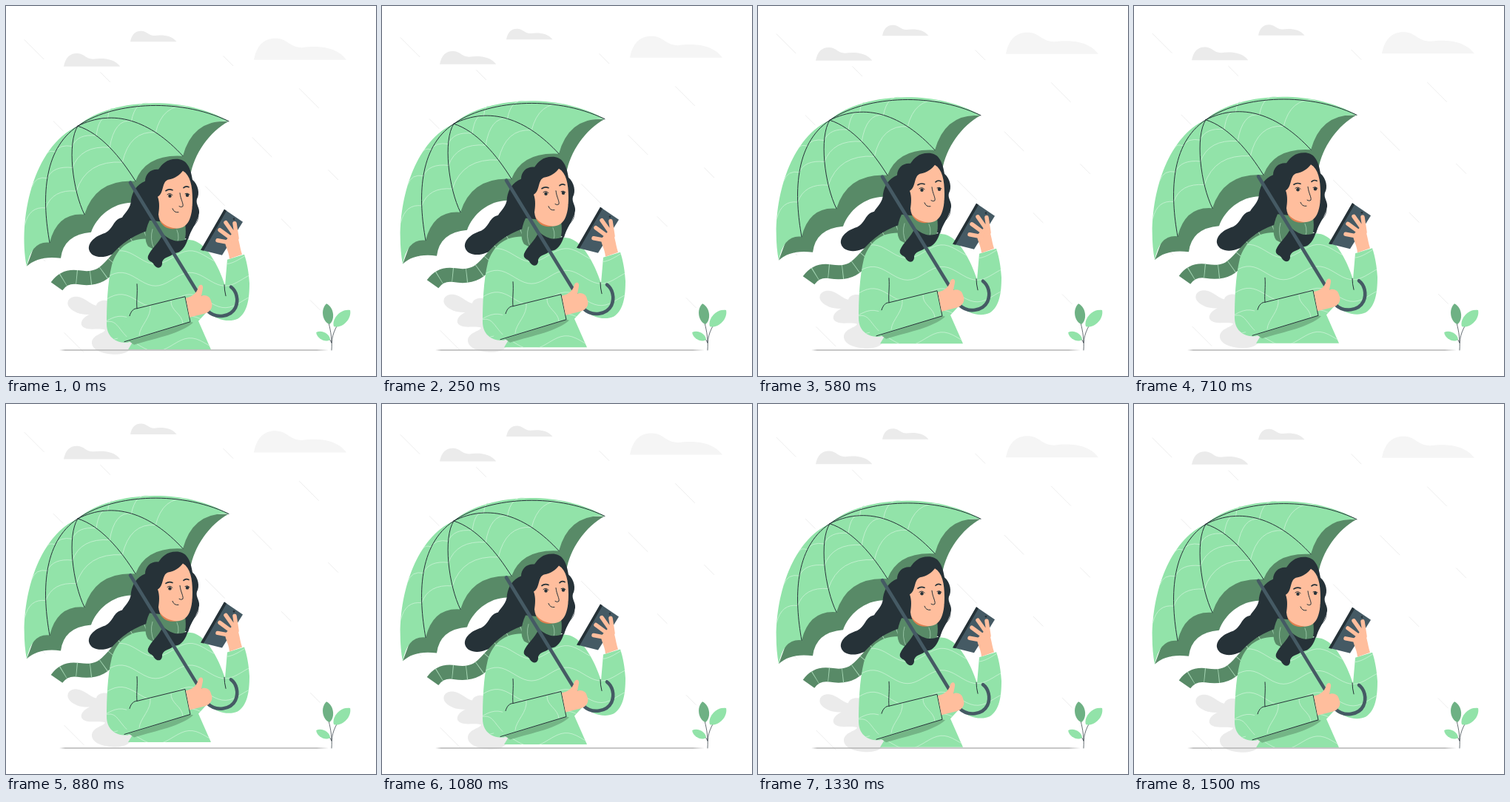
These frames come from a looping animation (500x500 px, 1.54 s). An HTML page:

```html
<!DOCTYPE html>
<html lang="en">
<head>
<meta charset="utf-8">
<style>
html, body { margin: 0; height: 100%; overflow: hidden; background: #fff; }
svg { display: block; width: 100vw; height: 100vh; }
.line { fill: none; stroke-linecap: round; stroke-linejoin: round; }
.ink { stroke: #263238; stroke-width: 1; }
.bold { stroke-width: 1.7; }
.fine { stroke-width: .7; }
.knit { stroke: #c6f1d2; stroke-width: .9; }
.rain { stroke: #ebebeb; stroke-width: .9; }
.pole { stroke: #455a64; stroke-width: 4.6; }
.scarf { fill: none; stroke: #588a67; stroke-width: 19; }
.stripes { stroke: #a5d5b3; stroke-dasharray: .9 18; stroke-dashoffset: -12; }
.finger { stroke: #ffbe9d; stroke-width: 5.5; }
.mint { fill: #92e3a9; }
.moss { fill: #588a67; }
.hair { fill: #263238; }
.skin { fill: #ffbe9d; }
.mist { fill: #ebebeb; }
</style>
</head>
<body>
<svg viewBox="0 0 500 500">
  <defs>
    <path id="cloud" d="M0 0C4-21 15-30 31-29C46-28 48-17 65-16.500C84-19 111-19 125 0Z"/>
    <path id="leaf" d="M0 0C4-8 20-9 26 0C20 9 4 8 0 0Z"/>
    <path id="sweater" d="M194 315C166 313 150 328 143 350C137 374 136 407 136 430C136 447 148 456 164 455L172 453L165 464.500H277L260 426L272 413C282 423 300 429 313 423C326 415 329 397 329 375C328 360 326 348 322 336L299 343L296 378C287 350 271 322 253 317L231 314Z"/>
    <path id="tail" d="M68.500 379Q79 364 98 367C147 375 138 332 194 313"/>
    <clipPath id="inside"><use href="#sweater"/></clipPath>
  </defs>

  <g id="scene">
    <use href="#cloud" fill="#f5f5f5" transform="translate(335 73)"/>
    <use href="#cloud" class="mist" transform="translate(78 82) scale(.61)"/>
    <use href="#cloud" class="mist" transform="translate(168 48.500) scale(.5)"/>
    <path id="rain" class="line rain"/>
    <path class="mist" d="M96 393C85 392 80 401 86 408C92 415 104 418 113 417C102 422 98 431 106 435C113 439 125 435 134 438C132 443 118 444 116 454C115 466 133 471 148 471C161 471 169 466 172 457L146 402C137 396 124 397 122 405C114 404 107 394 96 393Z"/>

    <!-- umbrella -->
    <path class="moss" d="M28 352Q44 337 74 341Q78 309 115 306C122 285 145 265 172 266L249 230C254 200 275 170 301 156L98 162Z"/>
    <path id="canopy" class="mint"/>
    <path id="weave" class="line knit"/>
    <path id="ribs" class="line ink"/>

    <!-- hair and scarf -->
    <path class="hair" d="M230 207C217 207 211 214 206 221C196 220 188 227 188 237C176 242 171 251 169 262C169 274 160 280 157 286C144 289 146 301 134 307C121 311 111 319 112 329C115 341 131 341 140 337C153 334 158 320 170 314C187 309 195 303 213 302L246 316C249 303 259 293 261 280C262 273 256 268 258 261C262 254 260 242 252 235C249 216 243 207 230 207Z"/>
    <use href="#tail" class="scarf"/>
    <use href="#tail" class="scarf stripes"/>

    <!-- sweater -->
    <use href="#sweater" class="mint"/>
    <path id="waves" class="line knit" clip-path="url(#inside)"/>
    <path class="mint" d="M150 452L167 412Q170 409 177 409L242 393L249 427L164 455Z"/>
    <path fill="#74b586" d="M166 453L249 427L253 428C236 443 206 448 173 458Z"/>
    <path class="line knit" d="M195 405C197 421 181 432 180 445M223 399C222 412 238 416 239 429M136 427C149 424 151 435 163 447"/>
    <path class="line ink" d="M177 376C178 389 176 398 177 409M167 419C169 412 173 409 177 409L242 393L249 427L160 454M295 377Q295 384 297 392"/>

    <!-- collar, lock and face -->
    <path class="moss" d="M194 290C187 305 187 318 192 325C202 332 221 334 234 330C243 322 244 307 242 295Z"/>
    <path class="line knit" stroke-opacity=".6" d="M198 302Q194 315 200 328M231 303Q236 314 229 326"/>
    <path class="hair" d="M212 308C206 322 196 328 192 338C190 346 199 345 200 350C205 357 212 354 211 346C214 338 224 340 226 334C235 336 243 326 246 314C234 321 222 318 212 308Z"/>
    <path class="skin" d="M239 223C249 229 252 243 252 262C252 287 246 301 230 301C216 301 207 295 206 282C207 275 208 266 205 258C214 253 210 238 219 235C229 233 234 229 239 223Z"/>
    <path fill="#df8050" d="M207 288C213 297 221 300 231 301C218 303 211 298 207 288Z"/>
    <path class="line ink fine" d="M252 272C263 280 262 290 252 299C247 303 246 307 247 311"/>
    <path class="line ink" d="M235 253C236 262 240 267 239 271Q237 273 234 271M218 255Q222 252 225 256M242 254Q245 252 248 255M225 274Q227 280 233 279"/>
    <path class="line ink bold" d="M216 250Q220 247 225 249M240 246Q243 243 247 245"/>
    <circle class="hair" cx="221.500" cy="257" r="2.200"/>
    <circle class="hair" cx="245" cy="256" r="2.200"/>

    <!-- handle, phone and hands -->
    <path class="line pole" stroke-linecap="butt" d="M168 239L263 394M272 412C284 424 304 420 310 408C315 397 311 385 304 380"/>
    <path class="skin" d="M243 395C252 393 258 388 260 380C262 375 267 377 266 382L264 392C270 390 276 393 277 399C281 407 276 414 268 416L248 421Z"/>
    <path fill="#455a64" d="M295 275L320 292L292 337L264 330Z"/>
    <path class="hair" d="M295 275L298 277L267 331L263 330Z"/>
    <circle class="hair" cx="308" cy="288" r="1.300"/>
    <path class="skin" d="M302 342C301 331 296 325 296 318L309 304C315 312 315 323 319 336Z"/>
    <path class="line finger" d="M309 310L297 293M304 314L289 303M302 320L286 317M312 314L309 294"/>
  </g>

  <path fill="#b4b4b4" d="M72 465L80 464.200H420L436 465L420 465.800H80Z"/>
  <path class="line ink fine" d="M440 465C441 452 439 440 436 428M440 455C441 442 447 430 457 419M440 455Q436 446 427 442"/>
  <use href="#leaf" fill="#6eb184" transform="translate(437 430) rotate(-98) scale(1.080)"/>
  <use href="#leaf" class="mint" transform="translate(443 433) rotate(-45) scale(1.200)"/>
  <use href="#leaf" class="mint" transform="translate(438 451) rotate(208) scale(.82)"/>
</svg>
<script>
const LOOP = 1540;
const scene = document.getElementById('scene');
const setPath = (id, d) => document.getElementById(id).setAttribute('d', d);
const range = n => [...Array(n).keys()];

// Ribs leave the apex as cubics: two control points and a tip, left to right.
const apex = [97, 162.5];
const ribs = [
  [[36, 190], [16, 290], [28, 352]],
  [[48, 195], [49, 265], [59, 320]],
  [[82, 185], [90, 250], [106, 282]],
  [[128, 172], [155, 205], [175, 237]],
  [[145, 138], [195, 155], [239, 203]],
  [[140, 125], [240, 120], [301, 156]]
];
const topSeam = [[140, 132], [230, 122], [301, 156]];

const pointOn = ([b, c, d], t) => [0, 1].map(k =>
  (1 - t) ** 3 * apex[k] + 3 * t * (1 - t) ** 2 * b[k] +
  3 * t * t * (1 - t) * c[k] + t ** 3 * d[k]);

// Scallop rising from the lower left point p to the upper right point q.
const scallop = (p, q) => `Q${p[0] + .22 * (q[0] - p[0])} ${q[1] - 3} ${q}`;
const ribPath = rib => `M${apex}C${rib.join(' ')}`;

const tips = ribs.map(rib => rib[2]);
const hem = tips.slice(1).map((tip, i) => scallop(tips[i], tip)).join('');
const [edge, crown] = [ribs[0], ribs[5]];
setPath('canopy', `M${tips[0]}${hem}C${crown[1]} ${crown[0]} ${apex}C${edge.join(' ')}Z`);
setPath('ribs', [...ribs.slice(1, 5), topSeam].map(ribPath).join(''));
setPath('weave', [.28, .5, .73].flatMap(t => ribs.slice(1).map((rib, i) => {
  const start = pointOn(ribs[i], t);
  return `M${start}${scallop(start, pointOn(rib, t))}`;
})).join(''));

setPath('waves', range(5).map(row => 'M' + range(41).map(i => {
  const x = 132 + 5 * i;
  return `${x} ${340 + 29.5 * row - 9 * Math.cos((x - 155) * Math.PI / 47)}`;
}).join('L')).join(''));

// Drops step down the sky, spread sideways by the golden ratio.
setPath('rain', range(19).map(i => {
  const length = i % 3 ? 13 : 26;
  return `M${25 + 435 * (i * .618 % 1)} ${46 + 22 * i}l${length} ${length}`;
}).join(''));

function draw() {
  const phase = (performance.now() % LOOP + 70) / LOOP * 2 * Math.PI;
  const y = 4.3 * Math.cos(phase) - 4.4;
  scene.setAttribute('transform', `translate(0 ${y.toFixed(2)})`);
  requestAnimationFrame(draw);
}
draw();
</script>
</body>
</html>
```
